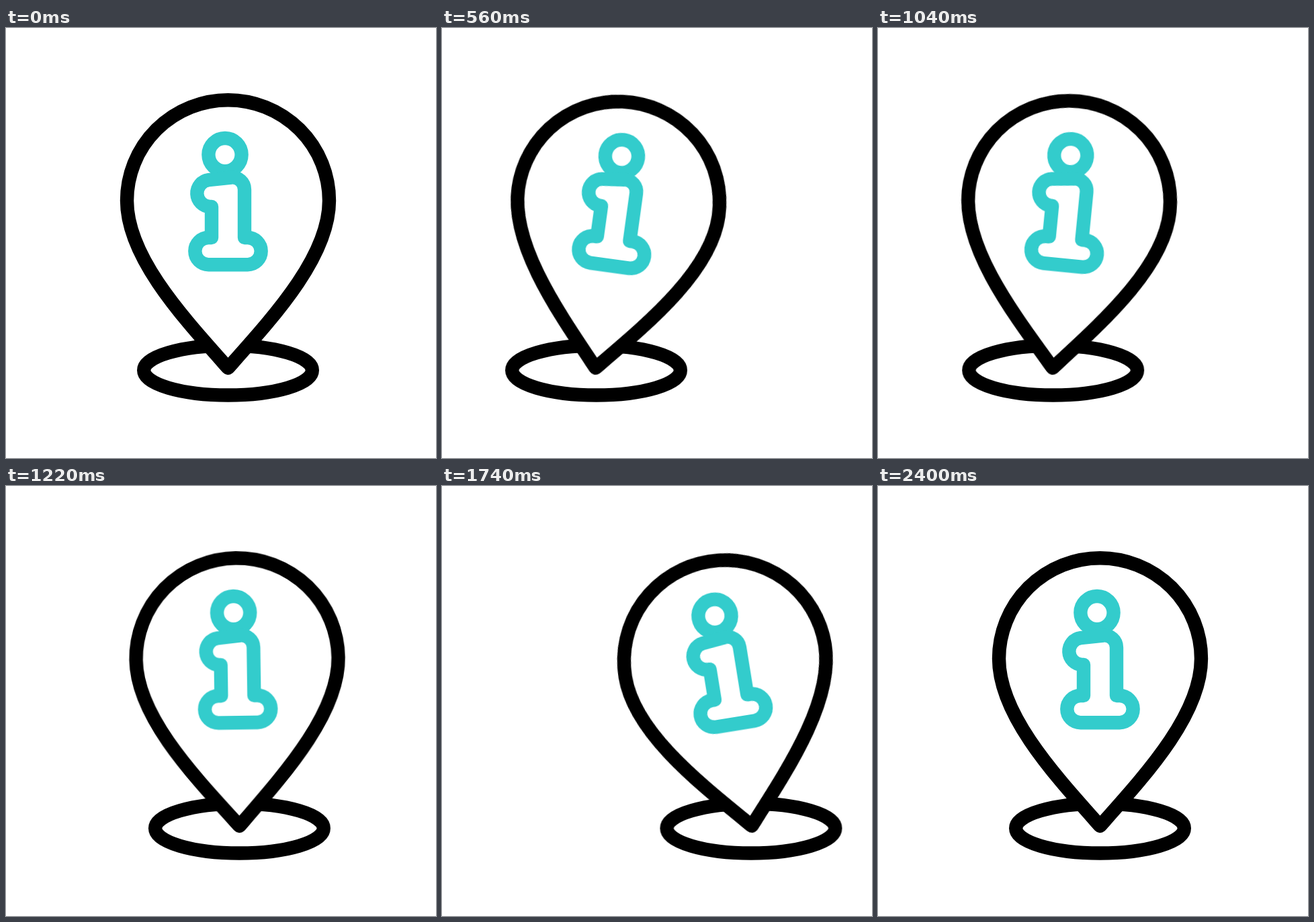
Animation, 640 px wide and 640 px high, one loop 2.42 s. Source, as an HTML page:

```html
<!DOCTYPE html>
<html lang="en">
<head>
<meta charset="utf-8">
<title>Info pin</title>
<style>
  html, body { margin: 0; width: 100%; height: 100%; overflow: hidden; background: #fff; }
  svg { display: block; width: 100%; height: 100%; }
  path, circle, ellipse {
    fill: none;
    stroke: #000;
    stroke-width: 20.4;
    stroke-linecap: round;
    stroke-linejoin: round;
  }
  .pin { fill: #fff; }
  .info > * { stroke: #3cc; }

  .slide, .tilt { animation: 2420ms cubic-bezier(.333, 0, .667, 1) infinite; }
  .slide { animation-name: slide; }
  .tilt { animation-name: tilt; transform-origin: 330.5px 499px; }

  /* three 800 ms swings, then a 20 ms rest */
  @keyframes slide {
    0%, 99.174%, 100% { transform: translateX(0); }
    33.058% { transform: translateX(-128.5px); }
    66.116% { transform: translateX(141.1px); }
  }
  @keyframes tilt {
    0%, 99.174%, 100% { transform: rotate(0deg); }
    33.058% { transform: rotate(10deg); }
    66.116% { transform: rotate(-10deg); }
  }
</style>
</head>
<body>
<svg viewBox="0 0 640 640">
  <g class="slide">
    <ellipse cx="330.5" cy="509.5" rx="125.3" ry="37"/>
    <g class="tilt">
      <path class="pin" d="M330.5 506C400 428 481 340 481 257A150.5 149.8 0 0 0 180 257C180 340 261 428 330.5 506Z"/>
      <g class="info">
        <circle cx="326" cy="188.6" r="24.6"/>
        <path d="M355 312H359.6a20.1 20.1 0 0 1 0 40.2H301.4a20.1 20.1 0 0 1 0-40.2H306V265.9H303.6a20 20 0 0 1-2-39.8L335.2 222.5A18 18 0 0 1 355 240.4Z"/>
      </g>
    </g>
  </g>
</svg>
</body>
</html>
```
